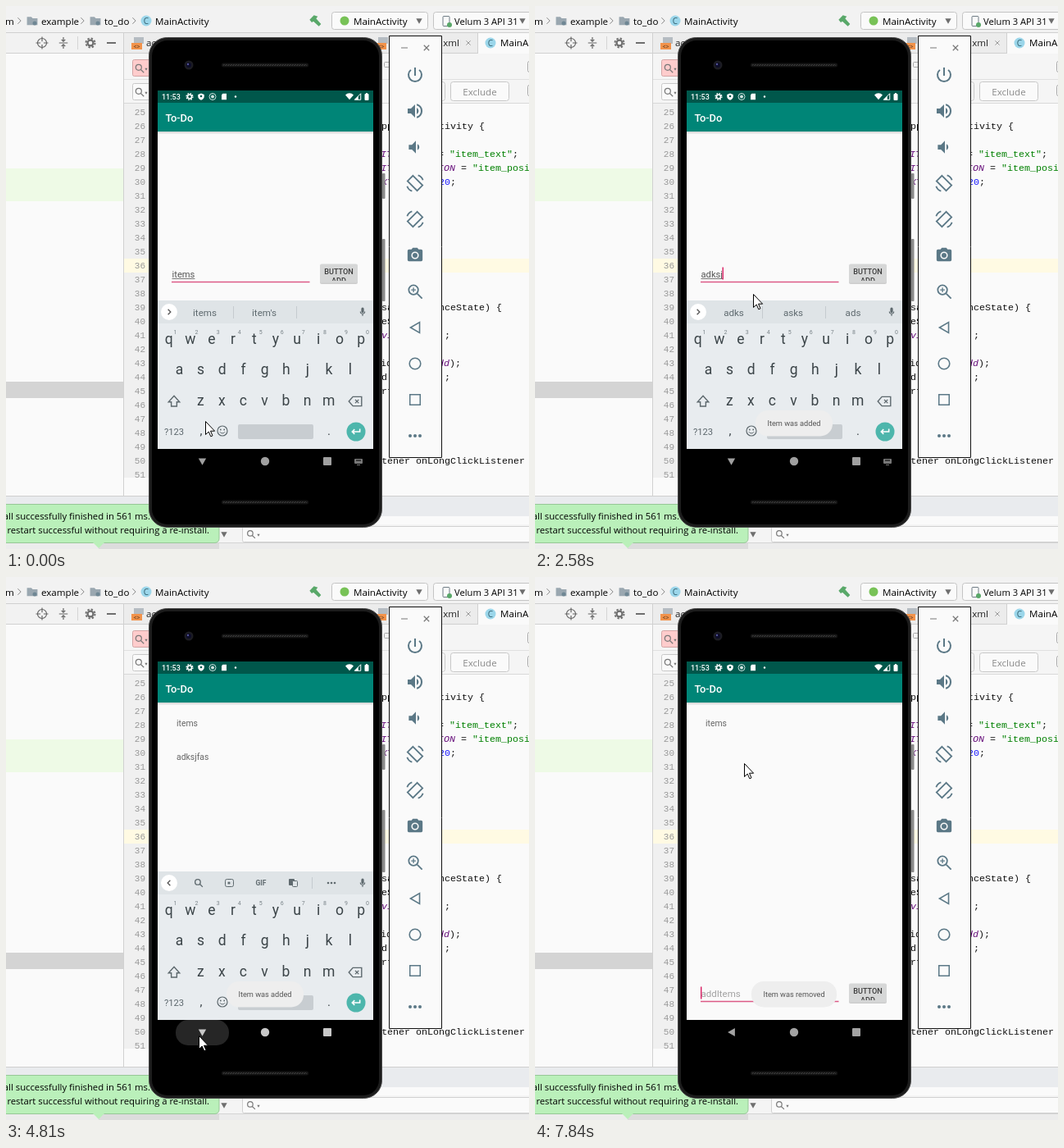
An HTML page with a canvas for the animation above (7990 ms loop, 638x662 px).

```html
<!DOCTYPE html>
<html lang="en">
<head>
<meta charset="utf-8">
<title>To-Do demo</title>
<style>
html, body { margin: 0; width: 100%; height: 100%; overflow: hidden; background: #fafafa; }
canvas { display: block; }
</style>
</head>
<body>
<canvas id="stage" width="638" height="662"></canvas>
<script>
const LOOP = 7990, TICK = LOOP / 60;
const stage = document.getElementById('stage').getContext('2d');
let g = stage;

const PAPER = '#fafafa';
const UI = '"Open Sans", "Noto Sans", sans-serif';
const APP = 'Roboto, sans-serif';
const MONO = '"Liberation Mono", monospace';

function rect(x, y, w, h, color, r = 0, border) {
  g.beginPath();
  g.roundRect(x, y, w, h, r);
  if (color) { g.fillStyle = color; g.fill(); }
  if (border) { g.strokeStyle = border; g.lineWidth = 1; g.stroke(); }
}
function disc(x, y, r, color, width) {
  g.beginPath();
  g.arc(x, y, r, 0, 7);
  if (width) { g.strokeStyle = color; g.lineWidth = width; g.stroke(); }
  else { g.fillStyle = color; g.fill(); }
}
function text(s, x, y, font, color, align = 'left') {
  g.font = font;
  g.fillStyle = color;
  g.textAlign = align;
  g.textBaseline = 'alphabetic';
  g.fillText(s, x, y);
  return g.measureText(s).width;
}
// Icons live on a 24 unit grid centred on (x, y).
function icon(d, x, y, size, color, width = 0, flip = 1) {
  const k = size / 24, p = new Path2D(d);
  g.save();
  g.translate(x, y);
  g.scale(k * flip, k);
  g.translate(-12, -12);
  if (width) { g.strokeStyle = color; g.lineWidth = width / k; g.stroke(p); }
  else { g.fillStyle = color; g.fill(p, 'evenodd'); }
  g.restore();
}

const ICON = {
  power: 'M13 3h-2v10h2zM17.8 5.2l-1.4 1.4A7 7 0 1 1 7.6 6.6L6.2 5.2a9 9 0 1 0 11.6 0z',
  quiet: 'M3 9v6h4l5 5V4L7 9zM14 8v8a4.5 4.5 0 0 0 0-8z',
  loud: 'M3 9v6h4l5 5V4L7 9zM14 8v8a4.5 4.5 0 0 0 0-8zM14 3.2v2.1a7 7 0 0 1 0 13.4v2.1a9 9 0 0 0 0-17.6z',
  rotate: 'M9.2 2L22 14.8L14.8 22L2 9.2ZM16 1.5a10 10 0 0 1 6.5 6.5M8 22.5a10 10 0 0 1-6.5-6.5',
  camera: 'M9 2L7.2 4H4a2 2 0 0 0-2 2v12a2 2 0 0 0 2 2h16a2 2 0 0 0 2-2V6a2 2 0 0 0-2-2h-3.2L15 2zM12 7a5 5 0 1 1 0 10a5 5 0 0 1 0-10z',
  loupe: 'M16 10A6 6 0 1 1 4 10A6 6 0 0 1 16 10M14.5 14.5L21 21',
  plus: 'M10 7v6M7 10h6',
  back: 'M19 4V20L5 12Z',
  down: 'M4 6H20L12 20Z',
  cross: 'M5 5L19 19M19 5L5 19',
  right: 'M9 5L16 12L9 19',
  left: 'M15 5L8 12L15 19',
  mic: 'M12 2a3 3 0 0 1 3 3v6a3 3 0 0 1-6 0V5a3 3 0 0 1 3-3zM18 11a6 6 0 0 1-5 6v4h-2v-4a6 6 0 0 1-5-6h2a4 4 0 0 0 8 0z',
  shift: 'M12 3L21 13H16.5V20H7.5V13H3Z',
  erase: 'M8 4H23V20H8L1 12ZM12 9l6 6M18 9l-6 6',
  enter: 'M20 6V12H5M9 7L4 12L9 17',
  folder: 'M1 4h9l3 3h10v14H1z',
  hammer: 'M2 10L10 2L17 4L14 8L23 18L19 22L9 13L6 15Z',
  shield: 'M12 1l10 4v7c0 5-4 9-10 11c-6-2-10-6-10-11V5z'
};

function gear(x, y, r, color, hole) {
  disc(x, y, r * .7, color);
  g.setLineDash([r * .36, r * .3076]);
  disc(x, y, r * .85, color, r * .3);
  g.setLineDash([]);
  disc(x, y, r * .36, hole);
}
function classIcon(x, y) {
  disc(x, y, 6.5, '#9bd6ea');
  text('C', x, y + 3.5, '10px ' + UI, '#33606f', 'center');
}
function fileIcon(x, y) {
  rect(x - 5, y - 7, 12, 8, '#b5bcc2');
  rect(x - 8, y, 13, 8, '#f2934b');
  text('<>', x - 1.5, y + 6.5, 'bold 7px ' + UI, '#7a4a25', 'center');
}
function arrow(x, y) { icon(ICON.down, x, y, 11, '#6e6e6e'); }

// Draws coloured runs of code that end at the given x.
function code(y, end, parts) {
  const color = { k: '#111', p: '#660e7a', s: '#008000', n: '#1a1aff' };
  let x = end;
  for (const [kind, s] of parts.reverse()) {
    const font = (kind === 'p' ? 'italic ' : '') + '11.67px ' + MONO;
    g.font = font;
    x -= g.measureText(s).width;
    text(s, x, y + 4, font, color[kind]);
  }
}

function drawEditor() {
  rect(0, 0, 638, 662, PAPER);
  rect(0, 0, 638, 58, '#f2f2f2');
  rect(0, 32, 638, 1, '#d0d0d0');
  rect(0, 57, 638, 1, '#d0d0d0');

  // breadcrumbs and run bar
  const ui = '11.6px ' + UI, ink = '#000';
  text('m', -1, 22.5, ui, ink);
  for (const x of [16, 93, 156]) icon(ICON.right, x, 18, 13, '#888', 1);
  for (const x of [32, 109]) {
    icon(ICON.folder, x, 18, 14, '#9aa7b0');
    disc(x + 3, 21, 2.5, '#6f8794');
  }
  text('example', 43, 22.5, ui, ink);
  text('to_do', 120, 22.5, ui, ink);
  classIcon(171, 18);
  text('MainActivity', 182, 22.5, ui, ink);
  icon(ICON.hammer, 377, 18, 16, '#59a869');
  rect(397.5, 7.5, 117, 21, PAPER, 3, '#c4c4c4');
  disc(413, 18, 5.5, '#78c257');
  text('MainActivity', 424, 22.5, ui, ink);
  arrow(504, 18);
  rect(521.5, 7.5, 125, 21, PAPER, 3, '#c4c4c4');
  rect(533, 12.5, 8, 12, null, 1, '#6e7b84');
  disc(541, 23, 3, '#59a869');
  text('Velum 3 API 31', 547, 22.5, '11.2px ' + UI, ink);
  arrow(630, 18);

  // project pane
  disc(44, 45, 5.5, '#666', 1.2);
  icon('M12 0V9M12 15V24M0 12H9M15 12H24', 44, 45, 15, '#666', 1.2);
  icon('M3 12H21M12 0V8M8 5L12 9L16 5M12 24V16M8 19L12 15L16 19', 70, 45, 14, '#666', 1.2);
  rect(87, 37, 1, 16, '#d5d5d5');
  gear(103, 45, 6.5, '#6e6e6e', '#f2f2f2');
  rect(123, 44, 11, 2, '#6e6e6e');
  rect(0, 198, 143, 40, '#eefae6');
  rect(0, 458, 143, 20, '#d4d4d4');

  // tabs and search rows
  rect(144, 33, 431, 24, '#ececec');
  rect(576, 33, 62, 25, PAPER);
  rect(575, 33, 1, 24, '#d0d0d0');
  fileIcon(161, 45);
  text('ac', 171, 48.5, ui, '#222');
  fileIcon(459, 45);
  text('.xml', 553, 48.5, ui, '#222', 'right');
  icon(ICON.cross, 564, 45, 9, '#999', 1);
  classIcon(591, 45);
  text('MainA', 603, 48.5, ui, ink);
  rect(144, 58, 494, 61, '#f5f5f5');
  rect(144, 89, 494, 1, '#e0e0e0');
  rect(144, 118, 494, 1, '#d8d8d8');
  rect(154.5, 65.5, 300, 20, '#ffcccc', 2, '#d3a5a5');
  rect(154.5, 94.5, 300, 20, PAPER, 2, '#c8c8c8');
  for (const y of [76, 105]) {
    icon(ICON.loupe, 163, y, 14, '#777', 1.2);
    icon(ICON.down, 171, y + 1, 5, '#777');
  }
  rect(461.5, 68.5, 6, 6, null, 1, '#aaa');
  rect(470.5, 92.5, 65, 23, PAPER, 3, '#c8c8c8');
  rect(542.5, 92.5, 71, 23, PAPER, 3, '#c8c8c8');
  text('Exclude', 578, 108.5, ui, '#8a8a8a', 'center');
  rect(636.5, 67.5, 9, 13, PAPER, 2, '#aaa');
  rect(636.5, 96.5, 9, 13, PAPER, 2, '#aaa');

  // gutter and code
  rect(144, 119, 30, 456, '#f0f0f0');
  rect(144, 308, 494, 17, '#fffae3');
  rect(143, 33, 1, 565, '#d0d0d0');
  for (let n = 25; n <= 51; n++) text(n, 170, 133 + (n - 25) * 17, '11px ' + MONO, '#999', 'right');
  rect(144, 575, 30, 6, PAPER);
  code(146, 584, [['k', 'AppCompatActivity {']]);
  code(180, 625, [['p', 'KEY_ITEM_TEXT'], ['k', ' = '], ['s', '"item_text"'], ['k', ';']]);
  code(197, 681, [['p', 'KEY_ITEM_POSITION'], ['k', ' = '], ['s', '"item_position"'], ['k', ';']]);
  code(214, 549, [['p', 'KEY_XT_CODE'], ['k', ' = '], ['n', '20'], ['k', ';']]);
  code(367, 605, [['k', 'savedInstanceState) {']]);
  code(384, 472, [['k', 'eS']]);
  code(401, 542, [['p', 'activity'], ['k', '       ;']]);
  code(435, 555, [['k', 'R.id.'], ['p', 'items_add'], ['k', ');']]);
  code(452, 542, [['k', 'd          ;']]);
  code(469, 472, [['k', 'rt']]);
  code(554, 633, [['k', 'stener onLongClickListener']]);

  // bottom panel
  rect(0, 597, 638, 25, '#e9ebee');
  rect(0, 597, 638, 1, '#cfcfcf');
  rect(0, 622, 638, 40, PAPER);
  rect(0, 632, 638, 22, '#f4f4f4');
  rect(0, 654, 638, 8, '#ececec');
  rect(0, 654, 638, 1, '#d4d4d4');
  arrow(266, 644);
  rect(288.5, 634.5, 400, 19, PAPER, 2, '#d0d0d0');
  icon(ICON.loupe, 299, 644, 13, '#777', 1.2);
  icon(ICON.down, 308, 645, 5, '#777');
  rect(113, 655, 147, 7, '#dcdcdc');
  rect(-8, 607.5, 268, 47, '#baf0ba', 5, '#96c796');
  g.fillStyle = '#baf0ba';
  g.fill(new Path2D('M106 654H120L113 661Z'));
  text('Install successfully finished in 561 ms.', 176, 626, '11.3px ' + UI, ink, 'right');
  text('restart successful without requiring a re-install.', 248, 643, '11.3px ' + UI, ink, 'right');
}

function drawPhone() {
  rect(459, 204, 3.5, 31, '#8a8a8a', 1);
  rect(459, 284, 3.5, 76, '#8a8a8a', 1);
  rect(174.5, 38.5, 284, 597, '#1c1c1c', 22, '#4a4a4a');
  rect(178, 42, 277, 590, '#000', 19);
  for (const y of [72, 605]) {
    rect(263, y - 2.5, 106, 5, '#141414', 2);
    g.setLineDash([2, 1]);
    rect(265, y - .5, 102, 1, null, 0, '#333');
    g.setLineDash([]);
  }
  disc(223, 72, 5.5, '#1c1c22');
  disc(223, 72, 3, '#0c0c28');
  disc(222, 71, 1.2, '#55559a');

  rect(185, 103, 263, 437, PAPER);
  rect(185, 103, 263, 15, '#00574b');
  rect(185, 118, 263, 35, '#008577');
  for (let i = 0; i < 3; i++) rect(185, 153 + i, 263, 1, `rgba(0,0,0,${.15 - i * .05})`);
  text('11:53', 190, 114, '500 9px ' + APP, '#fff');
  gear(224, 110.5, 4.6, '#fff', '#00574b');
  icon(ICON.shield, 238, 110.5, 9, '#fff');
  disc(238, 110, 1.3, '#00574b');
  disc(252, 110.5, 4, '#cfe3e0', 1);
  disc(252, 110.5, 2, '#cfe3e0');
  icon('M8 2H20V22H4V6Z', 266, 110.5, 9, '#fff');
  disc(280, 110.5, 1.2, '#fff');
  icon('M12 21L0 7a17 17 0 0 1 24 0z', 419, 110.5, 10, '#fff');
  icon('M2 22H22V2Z', 429, 110.5, 9, '#fff', 1);
  icon('M2 22H14V10Z', 429, 110.5, 9, '#fff');
  rect(437.5, 107, 5, 8, '#fff', 1);
  rect(439, 106, 2, 2, '#fff');
  text('To-Do', 194.5, 140.5, '500 12.9px ' + APP, '#fff');
}

function drawToolbar() {
  rect(467.5, 36.5, 64, 514, PAPER, 0, '#111');
  const c = '#5b7886', x = 499;
  rect(482, 50.5, 8, 1, '#777');
  icon(ICON.cross, 513, 51, 11, '#777', 1.2);
  icon(ICON.power, x, 84, 24, c);
  icon(ICON.loud, x, 128, 24, c);
  icon(ICON.quiet, x + 1, 172, 23, c);
  icon(ICON.rotate, x, 216, 22, c, 1.8);
  icon(ICON.rotate, x, 260, 22, c, 1.8, -1);
  icon(ICON.camera, x, 304, 22, c);
  disc(x, 304, 3, c);
  icon(ICON.loupe, x, 348, 23, c, 1.8);
  icon(ICON.plus, x, 348, 23, c, 1.3);
  icon(ICON.back, x, 392, 19, c, 1.6);
  disc(x, 436, 6.8, c, 1.6);
  rect(492, 473, 14, 14, c);
  rect(493.5, 474.5, 11, 11, PAPER);
  for (const d of [-6, 0, 6]) disc(x + d, 524, 2, c);
}

function drawKeyboard() {
  rect(185, 359, 263, 181, '#e8ecef');
  const key = '#3b4448', soft = '#5d686d', font = '17.5px ' + APP;
  const row = (keys, x0, y) => [...keys].forEach((k, i) => text(k, x0 + i * 26.05, y, font, key, 'center'));
  row('qwertyuiop', 198.7, 412);
  row('asdfghjkl', 211.5, 449);
  row('zxcvbnm', 237.3, 487);
  [...'1234567890'].forEach((n, i) => text(n, 206.5 + i * 26.05, 400, '7px ' + APP, '#7a8489', 'center'));
  icon(ICON.shift, 205, 482, 18, soft, 1.4);
  icon(ICON.erase, 426, 482, 17, soft, 1.4);
  text('?123', 205, 522.5, '11.2px ' + APP, soft, 'center');
  text(',', 238, 523, '15px ' + APP, key, 'center');
  disc(264, 518, 6, soft, 1.2);
  disc(261.8, 516.5, .9, soft);
  disc(266.2, 516.5, .9, soft);
  icon('M6 14a7 7 0 0 0 12 0', 264, 518, 13, soft, 1);
  rect(283, 510, 92, 18, '#c8cdd1', 2);
  text('.', 394, 523, '15px ' + APP, key, 'center');
  disc(427, 519, 11.5, '#4db6ac');
  icon(ICON.enter, 427, 519, 14, '#fff', 1.6);
}

function drawSuggestions(words) {
  rect(185, 359, 263, 28, '#dfe4e7');
  disc(199, 373, 10, '#fff');
  icon(words ? ICON.right : ICON.left, 199, 373, 11, '#555', 1.3);
  const c = '#5f6a6f', bar = '#c5cbcf';
  icon(ICON.mic, 435, 373, 13, c);
  if (!words) {
    icon(ICON.loupe, 235, 373, 13, c, 1.4);
    rect(267.5, 368.5, 10, 9, null, 2, c);
    disc(272, 373, 1.6, c);
    text('GIF', 311, 376, 'bold 8.5px ' + APP, c, 'center');
    rect(345, 368, 7, 8, c, 1);
    rect(349.5, 370.5, 6, 7, '#dfe4e7', 1, c);
    rect(373, 366, 1, 14, bar);
    for (const d of [-4, 0, 4]) disc(397 + d, 373, 1.3, c);
    return;
  }
  const spots = words.length === 1 ? [315] : [242.5, 315, 388];
  words.forEach((w, i) => text(w, spots[i], 377.5, '11.6px ' + APP, c, 'center'));
  if (words.length > 1) for (const x of [277, 354]) rect(x, 366, 1, 15, bar);
}

function drawInput(typed, caret, dy, pressed) {
  const base = 330.5 + dy;
  const w = typed ? text(typed, 202.5, base, '11.2px ' + APP, '#555') : 0;
  if (typed) rect(202.5, base + 1.5, w, 1, '#777');
  else text('addItems', 202.5, base, '11.5px ' + APP, '#a2a2a2');
  if (caret) rect(202 + w, 318.5 + dy, 1.4, 15, '#d81b60');
  rect(202, 335.8 + dy, 168.5, 1.5, '#dc5a86');
  rect(383, 316 + dy, 46, 23, 'rgba(0,0,0,.18)', 2);
  rect(383, 314.5 + dy, 46, 23, pressed ? '#cfd0d0' : '#d6d7d7', 2);
  g.save();
  g.beginPath();
  g.rect(383, 314 + dy, 46, 21);
  g.clip();
  const label = '500 9.1px ' + APP;
  text('BUTTON', 406, 327.3 + dy, label, '#3c3c3c', 'center');
  if (!pressed) text('ADD', 406, 338 + dy, label, '#3c3c3c', 'center');
  g.restore();
}

function drawToast(msg, alpha) {
  if (alpha <= 0) return;
  g.globalAlpha = alpha;
  g.font = '9.2px ' + APP;
  const w = g.measureText(msg).width + 29;
  rect(316 - w / 2, 493, w, 31.5, '#eeeeee', 15);
  text(msg, 316, 512.3, '9.2px ' + APP, '#555', 'center');
  g.globalAlpha = 1;
}

function drawNav(t, keys) {
  const ripple = ramp(t, 4640, 4750) * (1 - ramp(t, 4930, 5150));
  if (ripple > 0) rect(207, 540, 65, 31, `rgba(255,255,255,${.15 * ripple})`, 15);
  const v = t < 4270 ? 160 : t < 4930 ? 200 : 255 - 92 * ramp(t, 7300, 7780);
  const c = `rgb(${v},${v},${v})`;
  icon(keys ? ICON.down : ICON.back, 239.5, 555, keys ? 14 : 15, c);
  disc(316, 555, 5.2, c);
  rect(387, 550, 10, 10, c, 1);
  if (t < 4540) {
    rect(425, 552, 10, 6, '#777', 1);
    rect(427, 553.5, 6, 1, '#000');
    rect(428, 559, 4, 1, '#777');
  }
}

const ramp = (t, a, b) => Math.min(1, Math.max(0, (t - a) / (b - a)));
// Last entry whose start time has passed.
const at = (steps, t) => steps.filter(s => s[0] <= t).pop()[1];

const TYPED = [[0, 'items'], [960, ''], [2300, 'adk'], [2580, 'adksj'], [2730, 'adksjfas'], [3860, '']];
const WORDS = [[0, ['items', "item's", '']], [1260, null], [2300, ['ad', 'asks', 'add']],
  [2580, ['adks', 'asks', 'ads']], [2730, ['adksjfas']], [4270, null]];
const CARET = [[0, -500], [960, 960], [2300, 2300], [2580, 2580], [2730, 2730], [3860, 3860], [4930, 4840]];
const PATH = [
  [120, 243, 506], [400, 340, 420], [560, 444, 345], [760, 410, 326], [960, 396, 325], [1110, 380, 335],
  [1260, 378, 337], [1800, 266, 351], [3050, 266, 351], [3600, 399, 320], [3900, 398, 321],
  [4120, 372, 352], [4270, 350, 395], [4540, 270, 510], [4720, 235, 559], [4880, 235, 559],
  [5230, 275, 258], [5300, 275, 258], [5700, 255, 227]
];

function pointer(t) {
  const i = PATH.findIndex(p => p[0] > t);
  if (i === 0) return PATH[0].slice(1);
  if (i < 0) return PATH[PATH.length - 1].slice(1);
  const [a, b] = [PATH[i - 1], PATH[i]], k = ramp(t, a[0], b[0]);
  return [a[1] + (b[1] - a[1]) * k, a[2] + (b[2] - a[2]) * k];
}
function drawPointer([x, y]) {
  const p = new Path2D('M.5 .5V16.5L4.2 13L6.8 18.8L9 17.8L6.5 12.2H11.6Z');
  g.save();
  g.translate(Math.round(x), Math.round(y));
  g.fillStyle = '#fff';
  g.fill(p);
  g.strokeStyle = '#000';
  g.lineWidth = 1;
  g.stroke(p);
  g.restore();
}

const backdrop = document.createElement('canvas');
backdrop.width = 638;
backdrop.height = 662;
g = backdrop.getContext('2d');
drawEditor();
drawPhone();
drawToolbar();
g = stage;

function render(t) {
  g.drawImage(backdrop, 0, 0);
  const keys = t < 4930, list = t >= 4750;
  if (list) {
    text('items', 208, 181.5, '10.4px ' + APP, '#666');
    if (t < 6530) text('adksjfas', 208, 222.5, '10.4px ' + APP, '#666');
  }
  if (!list || !keys) {
    const caret = (t - at(CARET, t)) % 1000 < 500;
    drawInput(at(TYPED, t), caret, keys ? 0 : 181, t >= 3560 && t < 3860);
  }
  if (keys) {
    drawKeyboard();
    drawSuggestions(at(WORDS, t));
  }
  drawToast('Item was added', ramp(t, 1000, 1400) * (1 - ramp(t, 3120, 3400)));
  drawToast('Item was added', ramp(t, 4060, 4400) * (1 - ramp(t, 5900, 6250)));
  drawToast('Item was removed', ramp(t, 6600, 6800));
  drawNav(t, keys);
  // The pointer moves in even ticks, as a screen recorder samples it.
  drawPointer(pointer(Math.floor(t / TICK + .13) * TICK + 60));
}

const start = performance.now();
function frame() {
  render((performance.now() - start) % LOOP);
  requestAnimationFrame(frame);
}
frame();
</script>
</body>
</html>
```
